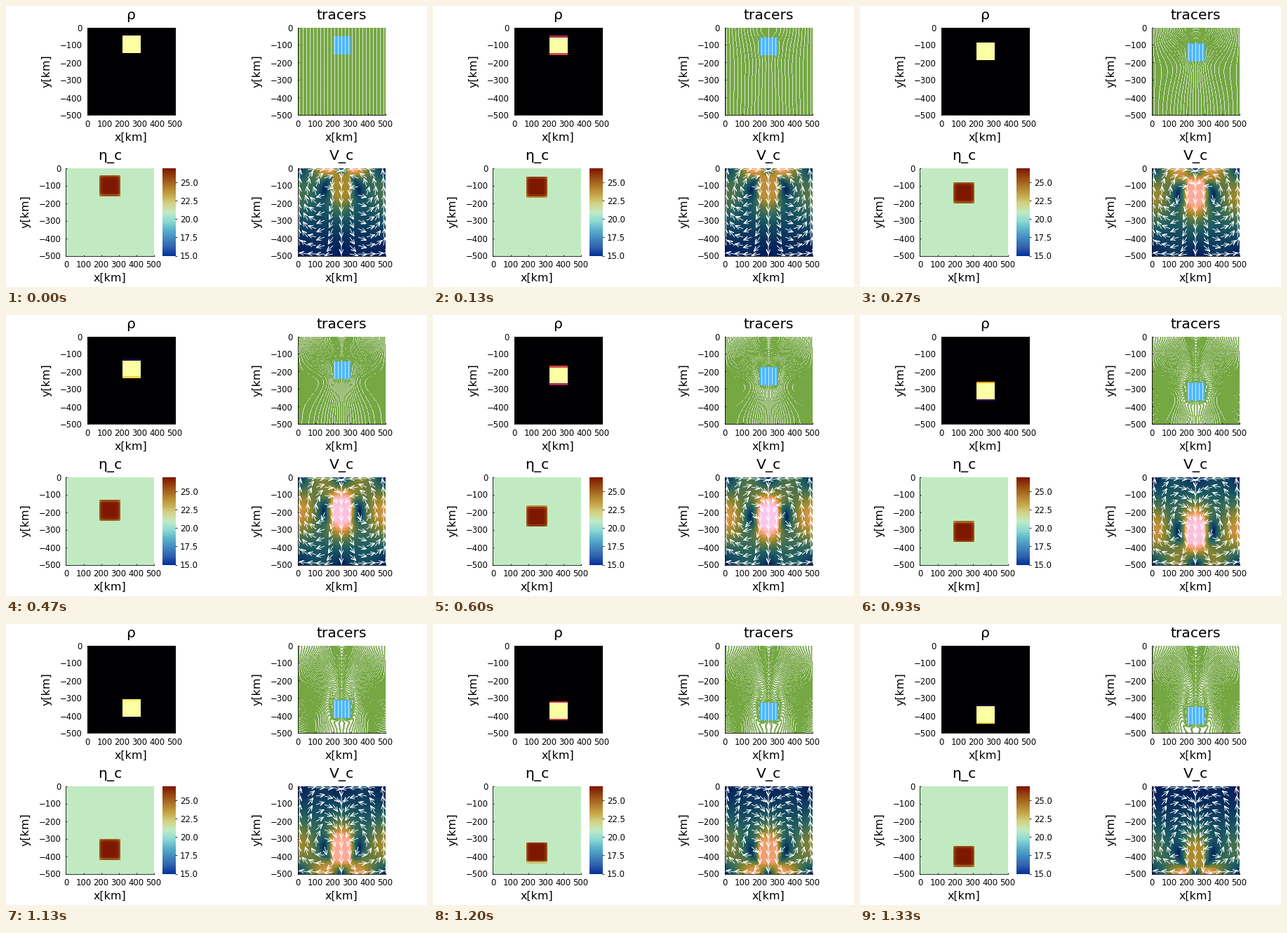
Recreate the animation shown at these times as a matplotlib script. Size 600x400 px, loop 1390 ms.

```python
import numpy as np
import matplotlib.pyplot as plt
from matplotlib.animation import FuncAnimation
from matplotlib.collections import LineCollection
from matplotlib.colors import LinearSegmentedColormap

W, H, DPI = 600, 400, 100
FRAMES, LOOP = 21, 1390
SIZE, BLOCK, LEFT = 500.0, 100.0, 200.0   # km
SUBSTEPS = 4
PT = 72 / DPI                             # points per pixel
plt.rcParams["font.family"] = "DejaVu Sans"


def colormap(name, colors):
    return LinearSegmentedColormap.from_list(name, np.array(colors) / 255, 256)


SPEED_MAP = colormap("speed", [
    (1, 25, 89), (16, 63, 96), (28, 90, 98), (60, 109, 86), (104, 123, 62),
    (157, 137, 43), (210, 147, 67), (248, 161, 123), (253, 183, 188),
    (250, 204, 250)])
VISC_MAP = colormap("visc", [
    (3, 49, 152), (48, 97, 174), (66, 139, 191), (92, 178, 203),
    (142, 219, 212), (194, 235, 196), (212, 210, 132), (196, 165, 72),
    (174, 120, 40), (152, 72, 18), (126, 23, 0)])

# depth of the block's top edge over time, in frames
PATH = np.polyfit([0, 4, 7, 11, 14, 17, 20],
                  [50, 90, 139, 210, 262, 310.5, 349], 6)


def top_at(t):
    return np.polyval(PATH, t)


# ---- Stokes flow around a rigid block, free-slip walls, sine modes ----
MODES = 64
wave = np.arange(1, MODES + 1) * np.pi / SIZE
BIHARM = (wave[:, None] ** 2 + wave[None, :] ** 2) ** 2
offsets = np.linspace(0, BLOCK, 11)
sin_bx = np.sin(np.outer(LEFT + offsets, wave))
target_psi = np.repeat(LEFT + offsets - SIZE / 2, len(offsets))


def solve(top):
    """Stream function modes for unit sinking speed, and the free speed."""
    sin_by = np.sin(np.outer(top + offsets, wave))
    basis = np.kron(sin_bx, sin_by)
    green = (basis / BIHARM.ravel()) @ basis.T
    force = np.linalg.solve(green, target_psi)
    modes = (force @ basis).reshape(MODES, MODES) / BIHARM
    return modes, 1 / (target_psi @ force)


def velocity(modes, xs, ys):
    """Rightward and downward velocity on the grid ys by xs."""
    ax_, ay = np.outer(xs, wave), np.outer(ys, wave)
    u = -(np.cos(ay) * wave) @ modes.T @ np.sin(ax_).T
    v = np.sin(ay) @ modes.T @ (np.cos(ax_) * wave).T
    return u, v


NODES = np.linspace(0, SIZE, 101)


def sample(grid, x, y):
    """Bilinear interpolation at marker positions."""
    gx = np.clip(x / SIZE * 100, 0, 99.999)
    gy = np.clip(y / SIZE * 100, 0, 99.999)
    i, j = gx.astype(int), gy.astype(int)
    fx, fy = gx - i, gy - j
    return ((grid[j, i] * (1 - fx) + grid[j, i + 1] * fx) * (1 - fy)
            + (grid[j + 1, i] * (1 - fx) + grid[j + 1, i + 1] * fx) * fy)


def advect(x, y, t0, t1):
    a, b = top_at(t0), top_at(t1)
    u, v = velocity(solve((a + b) / 2)[0], NODES, NODES)
    u, v = u * (b - a), v * (b - a)
    xm = x + sample(u, x, y) / 2
    ym = y + sample(v, x, y) / 2
    return (np.clip(x + sample(u, xm, ym), 0, SIZE),
            np.clip(y + sample(v, xm, ym), 0, SIZE))


mx, my = np.meshgrid(np.arange(2.5, SIZE, 5), np.arange(1.25, SIZE, 2.5))
mx, my = mx.ravel(), my.ravel()
in_block = ((abs(mx - LEFT - BLOCK / 2) < BLOCK / 2)
            & (abs(my - top_at(0) - BLOCK / 2) < BLOCK / 2))
block_x, block_y = mx[in_block], my[in_block] - top_at(0)
fluid = mx[~in_block], my[~in_block]
tracks = [fluid]
for n in range(FRAMES - 1):
    for s in range(SUBSTEPS):
        fluid = advect(*fluid, n + s / SUBSTEPS, n + (s + 1) / SUBSTEPS)
    tracks.append(fluid)


# ---- cell fields ----
CELLS = np.arange(5, SIZE, 10)


def overlap(start, width):
    """Share of a window of this width around each cell inside the block."""
    lo = np.maximum(CELLS - width / 2, start)
    hi = np.minimum(CELLS + width / 2, start + BLOCK)
    return np.clip(hi - lo, 0, None) / width


def density(top):
    return np.outer(overlap(top, 10), overlap(LEFT, 10))


def viscosity(top):
    return 21 + 6 * np.outer(overlap(top, 20), overlap(LEFT, 20)) ** 0.2


# ---- arrows ----
arrow_x, arrow_y = np.meshgrid(np.linspace(10, 490, 11), np.linspace(10, 490, 11))
ARROW, HEAD, SPREAD = 48, 28, np.radians(24)


def arrows(modes):
    u, v = velocity(modes, arrow_x[0], arrow_y[:, 0])
    angle = np.arctan2(-v, u).ravel()
    tail = np.column_stack([arrow_x.ravel(), -arrow_y.ravel()])

    def step(a, length):
        return length * np.column_stack([np.cos(a), np.sin(a)])

    tip = tail + step(angle, ARROW)
    sides = [tip - step(angle + d, HEAD) for d in (SPREAD, -SPREAD)]
    return list(np.stack([tail, tip, sides[0], tip, sides[1]], axis=1))


# ---- layout, in pixels from the top left ----
fig = plt.figure(figsize=(W / DPI, H / DPI), dpi=DPI, facecolor="white")


def add_axes(x, y, w, h):
    return fig.add_axes([x / W, 1 - (y + h) / H, w / W, h / H])


def label(x, y, text, size, **kw):
    fig.text(x / W, 1 - y / H, text, fontsize=size * PT, ha="center", **kw)


def panel(x, y, title, title_x):
    ax = add_axes(x, y, 125, 125)
    ax.set(xlim=(0, SIZE), ylim=(-SIZE, 0))
    ticks = np.arange(0, 501, 100)
    ax.set_xticks(ticks, [str(t) for t in ticks])
    ax.set_yticks(-ticks, [f"\u2212{t}" if t else "0" for t in ticks])
    ax.tick_params(direction="in", length=2 * PT, width=0.8 * PT,
                   labelsize=11.6 * PT)
    ax.tick_params(axis="x", pad=7 * PT)
    ax.tick_params(axis="y", pad=6.5 * PT)
    ax.set_axisbelow(False)
    ax.spines[["top", "right"]].set_visible(False)
    ax.spines[["left", "bottom"]].set_linewidth(0.8 * PT)
    label(title_x, y - 11.5, title, 20.3, va="baseline")
    label(x + 62.5, y + 161.5, "x[km]", 15.95, va="baseline")
    label(x - 57.5, y + 62.5, "y[km]", 15.95, va="center", rotation=90)
    return ax


def heatmap(ax, cmap, lo, hi):
    return ax.imshow(np.zeros((50, 50)), cmap=cmap, vmin=lo, vmax=hi,
                     extent=(0, SIZE, -SIZE, 0), aspect="auto",
                     interpolation="nearest")


rho_img = heatmap(panel(115.5, 30.5, "ρ", 178), "inferno", 0, 1)
eta_img = heatmap(panel(85.5, 230.5, "η_c", 148), VISC_MAP, 15, 27)

tracer_ax = panel(415.5, 30.5, "tracers", 478)


def markers(color):
    return tracer_ax.plot([], [], "s", ms=1.15 * PT, mew=0, color=color)[0]


fluid_dots, block_dots = markers("#75a743"), markers("#4db8ff")

speed_ax = panel(415.5, 230.5, "V_c", 478)
speed_img = heatmap(speed_ax, SPEED_MAP, 0, 1)
arrow_lines = LineCollection([], colors="white", linewidths=0.9 * PT)
speed_ax.add_collection(arrow_lines)

bar = add_axes(222.5, 230.5, 18, 125)
bar.imshow(np.linspace(27, 15, 256)[:, None], cmap=VISC_MAP, aspect="auto",
           extent=(0, 1, 15, 27))
bar.set_xticks([])
bar.yaxis.tick_right()
bar.set_yticks(np.arange(15, 26, 2.5))
bar.yaxis.set_major_formatter("{x:.1f}")
bar.tick_params(length=3 * PT, width=0.8 * PT, pad=4.5 * PT, labelsize=11.6 * PT)
bar.spines[:].set_visible(False)

SPEED_LIMIT = 1.75 * solve(top_at(0))[1]


def draw(n):
    top = top_at(n)
    modes, speed = solve(top)
    rho_img.set_data(density(top))
    eta_img.set_data(viscosity(top))
    x, y = tracks[n]
    fluid_dots.set_data(x, -y)
    block_dots.set_data(block_x, -(block_y + top))
    speed_img.set_data(np.hypot(*velocity(modes, CELLS, CELLS)) * speed / SPEED_LIMIT)
    arrow_lines.set_segments(arrows(modes))
    return rho_img, eta_img, fluid_dots, block_dots, speed_img, arrow_lines


anim = FuncAnimation(fig, draw, frames=FRAMES, interval=LOOP / FRAMES,
                     repeat=True, repeat_delay=0)
plt.show()
```
